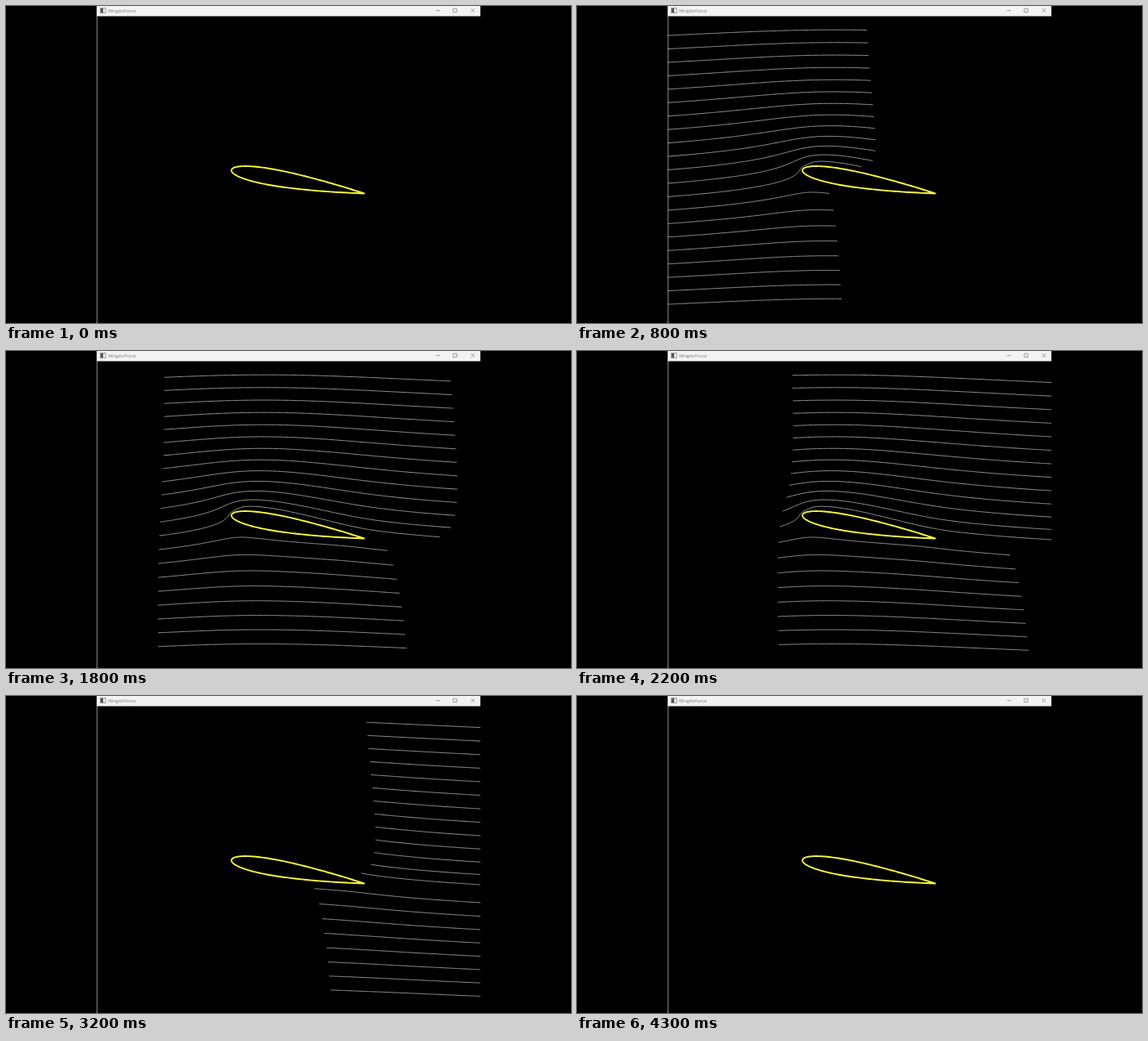
An HTML page with a canvas for the animation above (4.5 s loop, 692 by 388 pixels).

```html
<!DOCTYPE html>
<html lang="en">
<head>
<meta charset="utf-8">
<title>WingAirForce</title>
<style>
  html, body { margin: 0; width: 692px; height: 388px; overflow: hidden; background: #000; }
  canvas { display: block; }
</style>
</head>
<body>
<canvas id="stage" width="692" height="388"></canvas>
<script>
const ctx = document.getElementById('stage').getContext('2d');
const LEFT = 111, RIGHT = 581, BAR = 12.5;
const LOOP = 4500, STEP = 100, TRAIL = 328, LINES = 21;

// Distance blown by the free stream (px) at given times (ms); the flow slows as trails grow.
const PROGRESS = [
  [0, 0], [200, 70], [400, 129], [600, 183], [900, 250], [1200, 308], [1300, 328],
  [1800, 407], [2600, 537], [3200, 636], [3600, 704], [4200, 836], [4300, 900]
];

// Wing: chord line in screen space, and the circle whose Joukowski image it is.
const ALPHA = 10 * Math.PI / 180, CHORD = 165;
const NOSE = { x: 276.2, y: 200.8 }, ORIGIN = { x: 358.3, y: 215.3 };
const B = 40.96, SHIFT = 3.77, RADIUS = B + SHIFT;
const SWIRL = 2 * RADIUS * Math.sin(ALPHA);
const TURN = [Math.cos(ALPHA), Math.sin(ALPHA)];

// Complex numbers as [re, im].
const mul = ([a, b], [c, d]) => [a * c - b * d, a * d + b * c];
const inv = ([a, b]) => { const n = a * a + b * b; return [a / n, -b / n]; };
const root = ([a, b]) => {
  const r = Math.hypot(a, b);
  return [Math.sqrt(Math.max(0, r + a) / 2), (b < 0 ? -1 : 1) * Math.sqrt(Math.max(0, r - a) / 2)];
};

// Potential flow with circulation around the wing, in screen axes.
function velocity(x, y) {
  const z = mul([x - ORIGIN.x, ORIGIN.y - y], TURN);
  const w = mul(root([z[0] - 2 * B, z[1]]), root([z[0] + 2 * B, z[1]]));
  const zeta = [(z[0] + w[0]) / 2, (z[1] + w[1]) / 2];
  const eta = inv([zeta[0] + SHIFT, zeta[1]]);
  const dipole = mul(mul(eta, eta), TURN);
  const flow = [
    TURN[0] - RADIUS ** 2 * dipole[0] - SWIRL * eta[1],
    -TURN[1] - RADIUS ** 2 * dipole[1] + SWIRL * eta[0]
  ];
  const k = inv(zeta), k2 = mul(k, k);
  const v = mul(mul(flow, inv([1 - B * B * k2[0], -B * B * k2[1]])), TURN);
  // Air drifts outward as it rounds the nose, ever less with distance.
  const drift = 0.68 / (1 + ((x - 286) ** 2 + (y - 194) ** 2) / 12);
  return [v[0], v[1] - drift];
}

function trace(y) {
  let x = LEFT;
  const path = [[x, y]];
  while (x < RIGHT + 2 && path.length < 800) {
    const a = velocity(x, y);
    const m = velocity(x + a[0] / 2, y + a[1] / 2);
    x += m[0];
    y += m[1];
    path.push([x, y]);
  }
  return path;
}

const paths = Array.from({ length: LINES }, (_, i) => trace(36.1 + 16.45 * i));

const halfThickness = u => 0.6 * CHORD *
  (0.2969 * Math.sqrt(u) - 0.126 * u - 0.3516 * u ** 2 + 0.2843 * u ** 3 - 0.1036 * u ** 4);

function wingOutline() {
  const outline = new Path2D();
  for (let i = -60; i <= 60; i++) {
    const u = (i / 60) ** 2, h = Math.sign(i) * halfThickness(u);
    outline.lineTo(
      NOSE.x + u * CHORD * TURN[0] - h * TURN[1],
      NOSE.y + u * CHORD * TURN[1] + h * TURN[0]
    );
  }
  outline.closePath();
  return outline;
}
const wing = wingOutline();

function progressAt(t) {
  const i = PROGRESS.findIndex(([time]) => time >= t);
  if (i < 0) return PROGRESS[PROGRESS.length - 1][1];
  if (i === 0) return 0;
  const [t0, s0] = PROGRESS[i - 1], [t1, s1] = PROGRESS[i];
  return s0 + (s1 - s0) * (t - t0) / (t1 - t0);
}

function rect(color, x, y, w, h) {
  ctx.fillStyle = color;
  ctx.fillRect(x, y, w, h);
}

function segment(x0, y0, x1, y1) {
  ctx.beginPath();
  ctx.moveTo(x0, y0);
  ctx.lineTo(x1, y1);
  ctx.stroke();
}

function drawWindow() {
  rect('#000', 0, 0, 692, 388);
  rect('#808080', LEFT, 12, 1, 376);
  rect('#ddd', LEFT, 387, 1, 1);
  rect('#f3f3f3', LEFT, 0, RIGHT - LEFT, BAR);

  rect('#999', 115, 2, 7.5, 7);
  rect('#eee', 116, 3, 5.5, 5);
  rect('#555', 116, 3, 3, 5);

  ctx.fillStyle = '#777';
  ctx.font = '5.5px "Open Sans", sans-serif';
  ctx.textBaseline = 'alphabetic';
  ctx.fillText('WingAirForce', 125, 7.6);

  ctx.strokeStyle = '#777';
  ctx.lineWidth = 0.7;
  segment(526.5, 5.5, 531.5, 5.5);
  ctx.strokeRect(547.8, 3.2, 4.4, 4.4);
  segment(569.5, 3, 574, 7.8);
  segment(574, 3, 569.5, 7.8);
}

function drawTrails(progress) {
  const head = Math.round(progress), tail = Math.max(0, head - TRAIL);
  ctx.save();
  ctx.beginPath();
  ctx.rect(LEFT, BAR, RIGHT - LEFT, 388 - BAR);
  ctx.clip();
  ctx.strokeStyle = '#b8b8b8';
  ctx.lineWidth = 0.8;
  for (const path of paths) {
    ctx.beginPath();
    for (const [x, y] of path.slice(tail, head + 1)) ctx.lineTo(x, y);
    ctx.stroke();
  }
  ctx.restore();
}

function frame() {
  const t = Math.floor(performance.now() % LOOP / STEP) * STEP;
  drawWindow();
  if (t > 0) drawTrails(progressAt(t));
  ctx.strokeStyle = '#f8f83c';
  ctx.lineWidth = 1.9;
  ctx.lineJoin = 'round';
  ctx.stroke(wing);
  requestAnimationFrame(frame);
}
frame();
</script>
</body>
</html>
```
